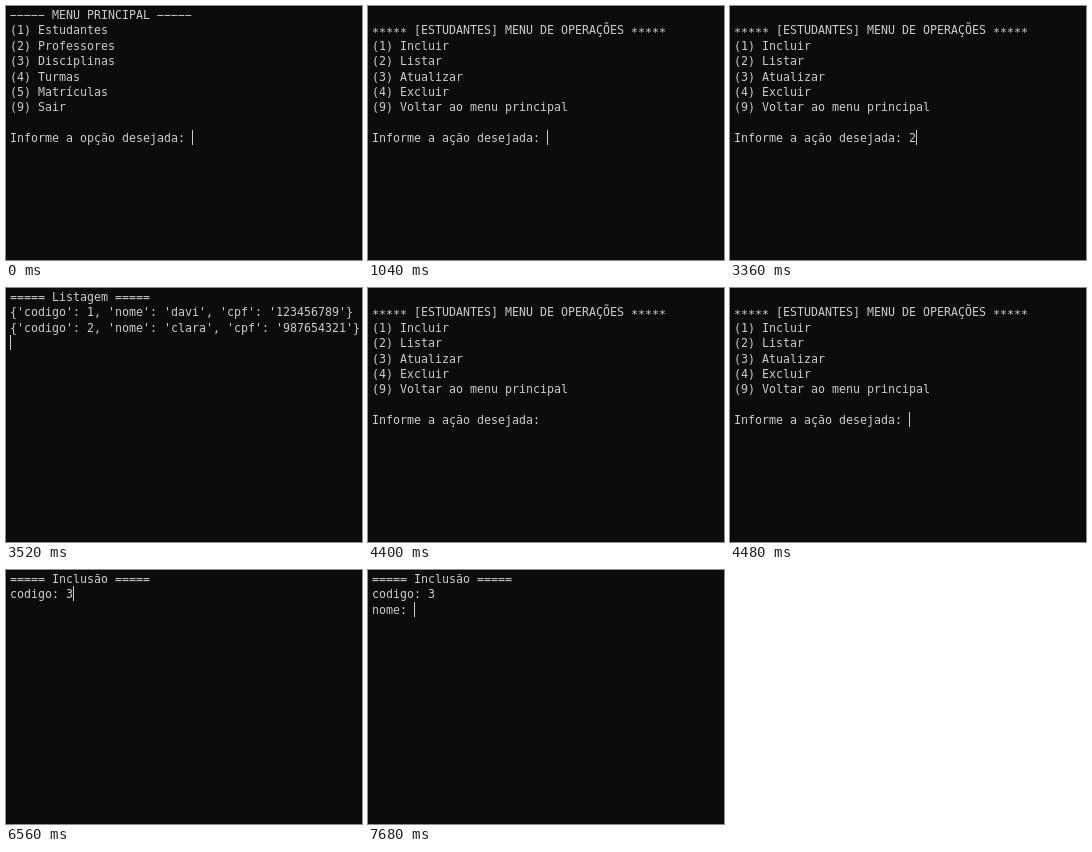
An HTML page with a canvas for the animation above (8000 ms loop, 356x254 px).

```html
<!DOCTYPE html>
<html lang="pt">
<head>
<meta charset="utf-8">
<title>Menu no terminal</title>
<style>
  html, body { margin: 0; width: 100%; height: 100%; overflow: hidden; background: #0c0c0c; }
  canvas { display: block; }
</style>
</head>
<body>
<canvas id="stage" width="356" height="254"></canvas>
<script>
const ctx = document.getElementById("stage").getContext("2d");
const LOOP = 8000, CELL = 7, ROW = 15.4, LEFT = 4, TOP = 1, BASE = 12;

const mainMenu = [
  "----- MENU PRINCIPAL -----",
  "(1) Estudantes",
  "(2) Professores",
  "(3) Disciplinas",
  "(4) Turmas",
  "(5) Matrículas",
  "(9) Sair",
  "",
  "Informe a opção desejada: "
];
const studentMenu = [
  "",
  "***** [ESTUDANTES] MENU DE OPERAÇÕES *****",
  "(1) Incluir",
  "(2) Listar",
  "(3) Atualizar",
  "(4) Excluir",
  "(9) Voltar ao menu principal",
  "",
  "Informe a ação desejada: "
];
const listing = [
  "===== Listagem =====",
  "{'codigo': 1, 'nome': 'davi', 'cpf': '123456789'}",
  "{'codigo': 2, 'nome': 'clara', 'cpf': '987654321'}",
  ""
];
const insertCode = ["===== Inclusão =====", "codigo: "];
const insertName = ["===== Inclusão =====", "codigo: 3", "nome: "];

// start time, screen, typed input
const scenes = [
  [0, mainMenu, ""],
  [320, mainMenu, "1"],
  [1040, studentMenu, ""],
  [2320, studentMenu, "1"],
  [2880, studentMenu, ""],
  [3040, studentMenu, "2"],
  [3520, listing, ""],
  [4320, studentMenu, ""],
  [5120, studentMenu, "1"],
  [5440, insertCode, ""],
  [6400, insertCode, "3"],
  [6960, insertName, ""]
];

// moments when the caret switches on or off; it starts on
const blinks = [
  80, 320, 560, 880, 1120, 1360, 1600, 1840, 2160, 2480,
  2800, 2880, 3120, 3360, 3600, 3840, 4160, 4480, 4720, 5040,
  5280, 5520, 5760, 6080, 6320, 6560, 6800, 7120, 7360, 7680
];

// wide dashes and mid-height stars, as the terminal font has them
const glyphs = s => s.replace(/-/g, "\u2212").replace(/\*/g, "\u2217");

function draw(t) {
  const [, screen, typed] = scenes.filter(s => s[0] <= t).pop();
  const caretOn = blinks.filter(b => b <= t).length % 2 === 0;
  const last = screen.length - 1;

  ctx.fillStyle = "#0c0c0c";
  ctx.fillRect(0, 0, 356, 254);
  ctx.fillStyle = "#cccccc";
  ctx.font = '11.63px "DejaVu Sans Mono", monospace';
  ctx.textBaseline = "alphabetic";
  screen.forEach((line, i) => {
    const text = i === last ? line + typed : line;
    ctx.fillText(glyphs(text), LEFT, TOP + BASE + i * ROW);
  });

  if (caretOn) {
    const x = LEFT + CELL * (screen[last].length + typed.length);
    ctx.fillRect(x, Math.round(TOP + last * ROW), 1, 15);
  }
}

const start = performance.now();
function frame() {
  draw((performance.now() - start) % LOOP);
  requestAnimationFrame(frame);
}
frame();
</script>
</body>
</html>
```
